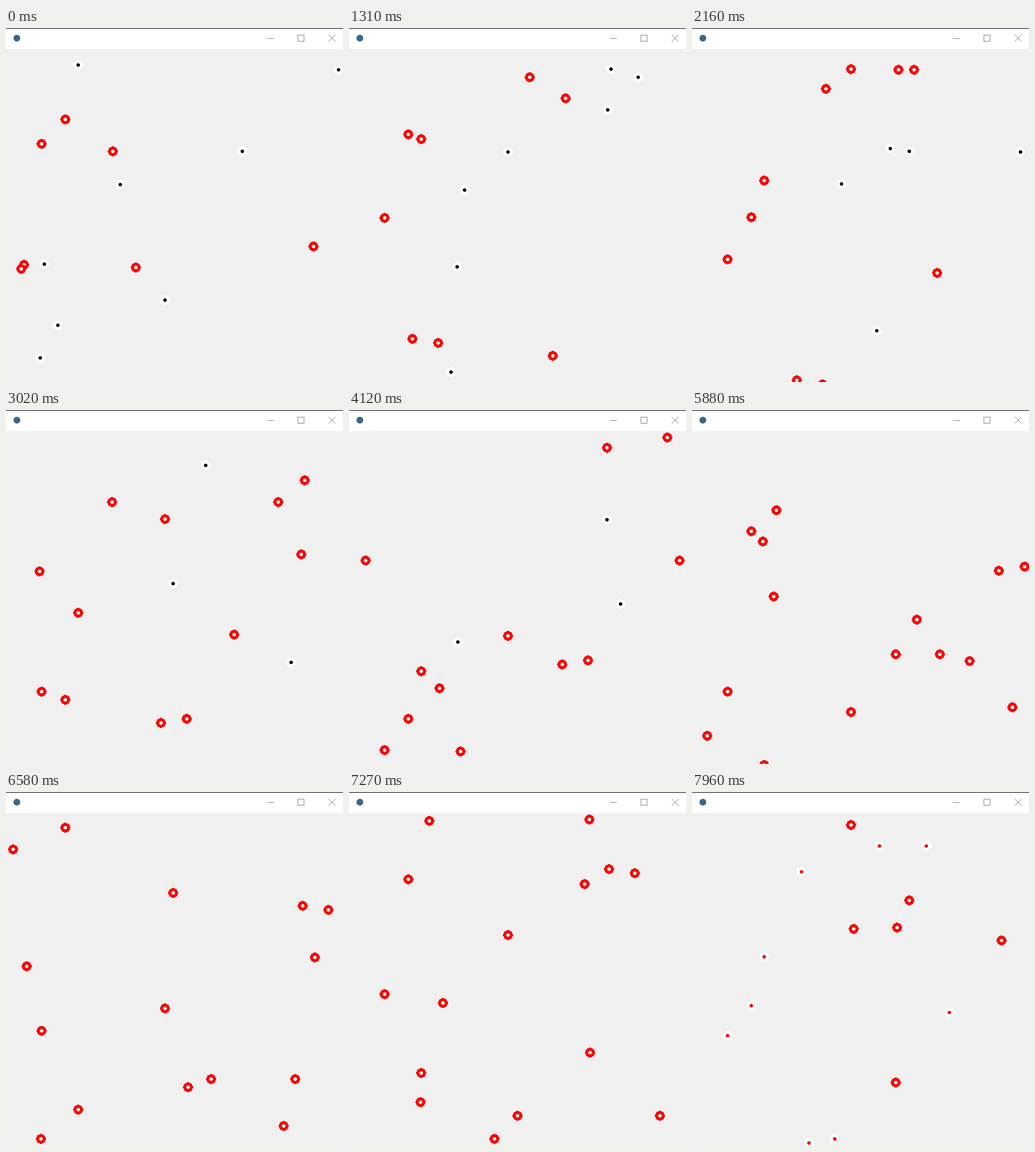
An HTML page with a canvas that plays this animation: 497 by 521 pixels, repeating every 8 s.

```html
<!DOCTYPE html>
<html lang="en">
<head>
<meta charset="utf-8">
<title>Contagion</title>
<style>
  html, body { margin: 0; width: 100%; height: 100%; overflow: hidden; background: #f0f0f0; }
  canvas { display: block; width: 497px; height: 521px; }
</style>
</head>
<body>
<canvas id="stage" width="497" height="521"></canvas>
<script>
const ctx = document.getElementById('stage').getContext('2d');
const LOOP = 8000;
const STEP = 77;
const LAST_TICK = 1168;
const REACH = 21;
const SICK_TICKS = 1010;
const BOUNDS = { left: 5, right: 495, top: 36, bottom: 526 };

// Pace of the simulation as [ms, tick]; the repeated time is a hard cut
const pace = [
  [0, 0], [1310, 109], [3020, 244], [4120, 330], [5110, 411], [6580, 531],
  [7420, 597], [7420, 1124], [7960, LAST_TICK]
];

const person = (x, y, vx, vy, sickAt) => ({ x, y, vx, vy, sickAt });
const sick = (...start) => person(...start, 0);
const healthy = (...start) => person(...start, Infinity);

const people = [
  sick(157, 181, 1, -1),
  sick(453, 321, 2, -2),
  sick(26, 348, -1, 1),
  sick(22, 354, 1, 1),
  sick(191, 352, 1, 2),
  sick(87, 134, 0, -2),
  sick(52, 170, 0, 1),
  healthy(106, 54, 0, 1),
  healthy(234, 400, 0, -2),
  healthy(490, 61, -1, -1),
  healthy(348, 181, 2, -1),
  healthy(168, 230, 2, -2),
  healthy(56, 347, -2, -1),
  healthy(76, 437, -2, 1),
  healthy(50, 485, 1, 2)
];

function stateOf(p, tick) {
  if (tick < p.sickAt) return 'healthy';
  return tick < p.sickAt + SICK_TICKS ? 'sick' : 'recovered';
}

function move(p) {
  p.x += p.vx;
  p.y += p.vy;
  if (p.x <= BOUNDS.left || p.x >= BOUNDS.right) p.vx = -p.vx;
  if (p.y <= BOUNDS.top || p.y >= BOUNDS.bottom) p.vy = -p.vy;
}

function infect(tick) {
  const carriers = people.filter(p => stateOf(p, tick) === 'sick');
  for (const p of people) {
    if (p.sickAt === Infinity && carriers.some(c => Math.hypot(c.x - p.x, c.y - p.y) < REACH)) {
      p.sickAt = tick;
    }
  }
}

// Run the simulation once, so that any moment can be drawn directly
const history = [];
for (let tick = 0; tick <= LAST_TICK; tick++) {
  infect(tick);
  history.push(people.map(p => ({ x: p.x, y: p.y, state: stateOf(p, tick) })));
  people.forEach(move);
}

function tickAt(ms) {
  const next = pace.findIndex(([time]) => ms < time);
  if (next < 0) return LAST_TICK;
  const [start, from] = pace[next - 1];
  const [end, to] = pace[next];
  const steps = Math.round((end - start) / STEP);
  const step = Math.floor((ms - start) / (end - start) * steps + 1e-6);
  return Math.round(from + (to - from) * step / steps);
}

function rect(color, x, y, w, h) {
  ctx.fillStyle = color;
  ctx.fillRect(x, y, w, h);
}

// Hard-edged disc built from pixel rows
function disc(cx, cy, radius, color) {
  for (let dy = -Math.floor(radius); dy <= radius; dy++) {
    const half = Math.floor(Math.sqrt(radius * radius - dy * dy));
    rect(color, cx - half, cy + dy, 2 * half + 1, 1);
  }
}

const looks = {
  healthy: { ring: '#fff', core: '#000' },
  sick: { ring: '#f00', core: '#fff' },
  recovered: { ring: '#fff', core: '#f00' }
};

function drawPerson({ x, y, state }) {
  disc(x, y, 7.2, looks[state].ring);
  disc(x, y, 2.5, looks[state].core);
}

function drawWindow() {
  rect('#f0f0f0', 0, 0, 497, 521);
  rect('#fff', 0, 0, 497, 31);
  rect('#2f2f31', 0, 0, 497, 1);
  ctx.fillStyle = '#3b668a';
  ctx.beginPath();
  ctx.arc(16, 15, 5, 0, 2 * Math.PI);
  ctx.fill();
  rect('#999', 385, 15, 10, 1);
  ctx.strokeStyle = '#999';
  ctx.lineWidth = 1;
  ctx.strokeRect(430.5, 10.5, 9, 9);
  ctx.beginPath();
  ctx.moveTo(476, 10);
  ctx.lineTo(486, 20);
  ctx.moveTo(486, 10);
  ctx.lineTo(476, 20);
  ctx.stroke();
}

function draw(ms) {
  drawWindow();
  ctx.save();
  ctx.beginPath();
  ctx.rect(2, 33, 495, 488);
  ctx.clip();
  history[tickAt(ms)].forEach(drawPerson);
  ctx.restore();
}

const startTime = performance.now();
function loop() {
  draw((performance.now() - startTime) % LOOP);
  requestAnimationFrame(loop);
}
loop();
</script>
</body>
</html>
```
